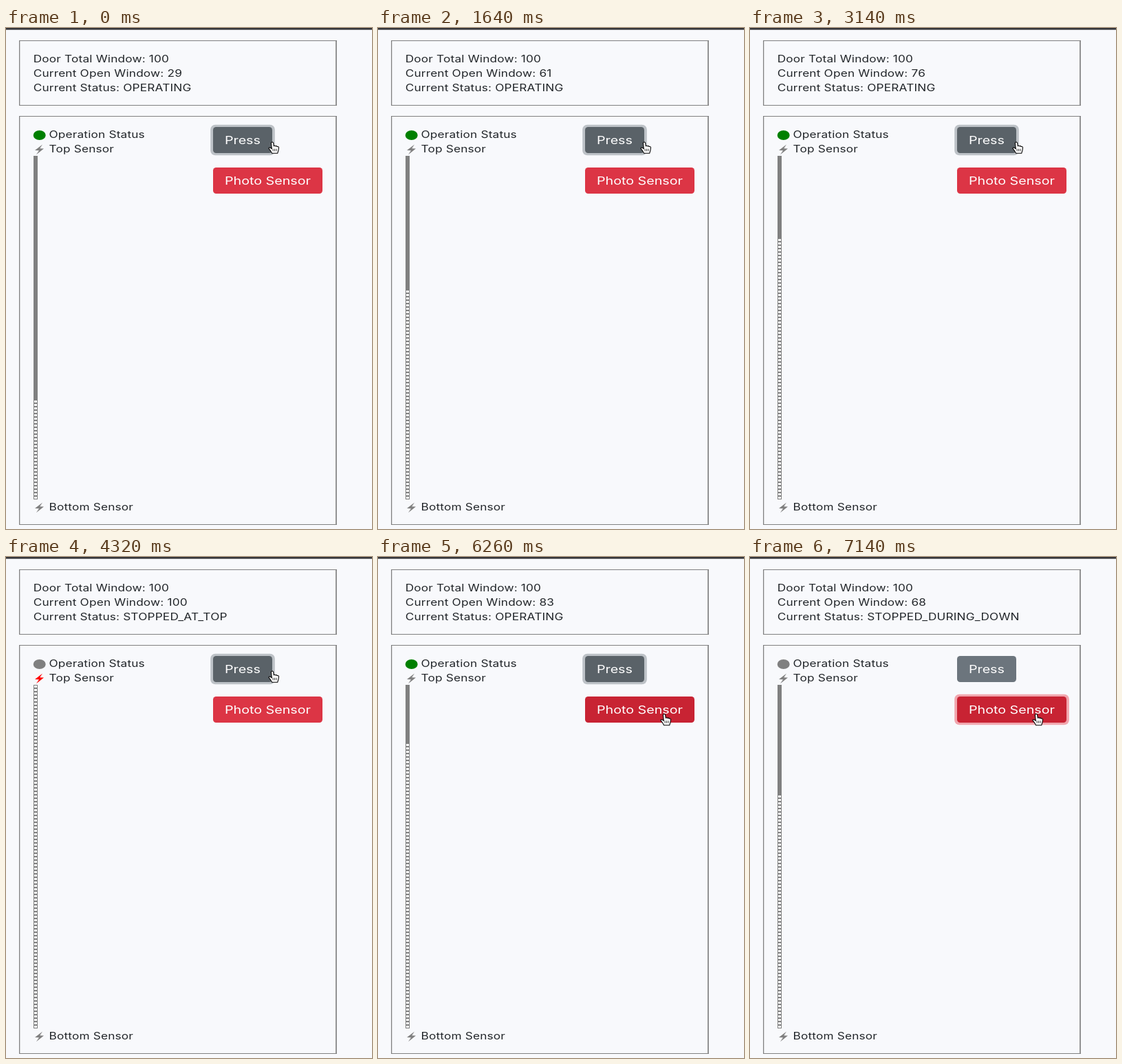
An HTML page with a canvas for the animation above (8 s loop, 532x729 px).

```html
<!DOCTYPE html>
<html lang="en">
<head>
<meta charset="utf-8">
<title>Door panel</title>
<style>
html, body { margin: 0; width: 532px; height: 729px; overflow: hidden; background: #f8f9fc; }
canvas { display: block; }
</style>
</head>
<body>
<canvas id="stage" width="532" height="729"></canvas>
<script>
const ctx = document.getElementById('stage').getContext('2d');
const LOOP = 8000, TICK = 148.7;
const GRAY = '#808080', INK = '#212529';
const STRETCH = 1.23; // the whole page is wider than natural
const hand = new Path2D('M-1.6 1.2Q0-.9 1.6 1.2L2.3 6Q3.6 4.8 4.8 6.2Q6.2 5.2 7.2 6.8Q9.3 6.2 9.5 8.2L9 12L7.7 16.5H-.4Q-2 13-5 9.6Q-5 7.4-2.6 8.6L-.7 10Z');
const bolt = new Path2D('M53 169.5L42 178L48 178.3L44 184.3L55 175.6L49.2 175.2Z');

function openCount(k) {
  if (k <= 7) return 29 + Math.round(20 * k / 7);
  if (k < 16) return 49 + 3 * (k - 7);
  if (k < 21) return 74;
  if (k < 29) return 76 + 3 * (k - 21);
  if (k < 37) return 100;
  return Math.max(68, 98 - 3 * (k - 37));
}

function statusAt(k) {
  if (k >= 16 && k < 21) return 'STOPPED_DURING_UP';
  if (k >= 29 && k < 37) return 'STOPPED_AT_TOP';
  return k >= 48 ? 'STOPPED_DURING_DOWN' : 'OPERATING';
}

function rect(x, y, w, h, color) {
  ctx.fillStyle = color;
  ctx.fillRect(x, y, w, h);
}

function text(str, x, y, size = 14, color = INK) {
  ctx.save();
  ctx.translate(x, y);
  ctx.scale(STRETCH, 1);
  ctx.font = `${size}px Inter, "Open Sans", sans-serif`;
  ctx.letterSpacing = size < 16 ? '0.15px' : '0px';
  ctx.fillStyle = color;
  ctx.fillText(str, 0, 0);
  ctx.restore();
}

function panel(y, h) {
  rect(19, y, 462, 1, GRAY);
  rect(19, y + h, 462, 1, GRAY);
  rect(19, y, 1.3, h, GRAY);
  rect(479.1, y, 1.7, h, GRAY);
}

function roundBox(x, y, w, h, r, color) {
  ctx.fillStyle = color;
  ctx.beginPath();
  ctx.roundRect(x, y, w, h, r);
  ctx.fill();
}

function button(label, y, w, color, ring) {
  if (ring) roundBox(297.2, y - 3.3, w + 7.6, 44.6, 7, ring);
  roundBox(301, y, w, 38, 4.5, color);
  text(label, 318, y + 25, 16, '#fff');
}

function sensor(label, dy, color) {
  ctx.save();
  ctx.translate(0, dy);
  ctx.fillStyle = color;
  ctx.fill(bolt);
  ctx.restore();
  text(label, 62.5, 181 + dy);
}

function door(open) {
  rect(40, 186, 6, 500, GRAY);
  for (let i = 100 - open; i < 100; i++) rect(41, 187 + i * 5, 4, 3, '#fff');
}

function pointer(p) {
  ctx.save();
  ctx.translate(387 + 29 * p, 165.8 + 62.5 * p);
  ctx.fillStyle = '#fff';
  ctx.strokeStyle = '#000';
  ctx.lineWidth = 1.1;
  ctx.lineJoin = 'round';
  ctx.fill(hand);
  ctx.stroke(hand);
  ctx.lineWidth = .8;
  ctx.beginPath();
  for (const x of [1.2, 3.6, 6]) {
    ctx.moveTo(x, 10);
    ctx.lineTo(x, 13.5);
  }
  ctx.stroke();
  ctx.restore();
}

function draw(now) {
  const k = Math.floor(now % LOOP / TICK);
  const open = openCount(k), status = statusAt(k);
  const halted = k >= 48;
  const m = Math.min(1, Math.max(0, (k - 38) / 4));
  const move = m * m * (3 - 2 * m);

  rect(0, 0, 532, 729, '#f8f9fc');
  rect(0, 0, 532, 2.6, '#343438');
  panel(18, 94);
  panel(128, 594);

  text('Door Total Window: 100', 39.7, 50);
  text('Current Open Window: ' + open, 39.7, 71);
  text('Current Status: ' + status, 39.7, 92);

  ctx.fillStyle = status === 'OPERATING' ? '#008000' : GRAY;
  ctx.beginPath();
  ctx.ellipse(48.7, 156, 9, 7, 0, 0, 7);
  ctx.fill();
  text('Operation Status', 62.5, 160);
  sensor('Top Sensor', 0, open === 100 ? '#f00' : GRAY);
  sensor('Bottom Sensor', 521, GRAY);
  door(open);

  button('Press', 144, 86, halted ? '#6c757d' : '#5a6268', halted ? null : '#bdc2c7');
  button('Photo Sensor', 203, 159, move > .5 ? '#c82333' : '#dc3545', halted ? '#f1a6ae' : null);
  pointer(move);
  requestAnimationFrame(draw);
}
requestAnimationFrame(draw);
</script>
</body>
</html>
```
